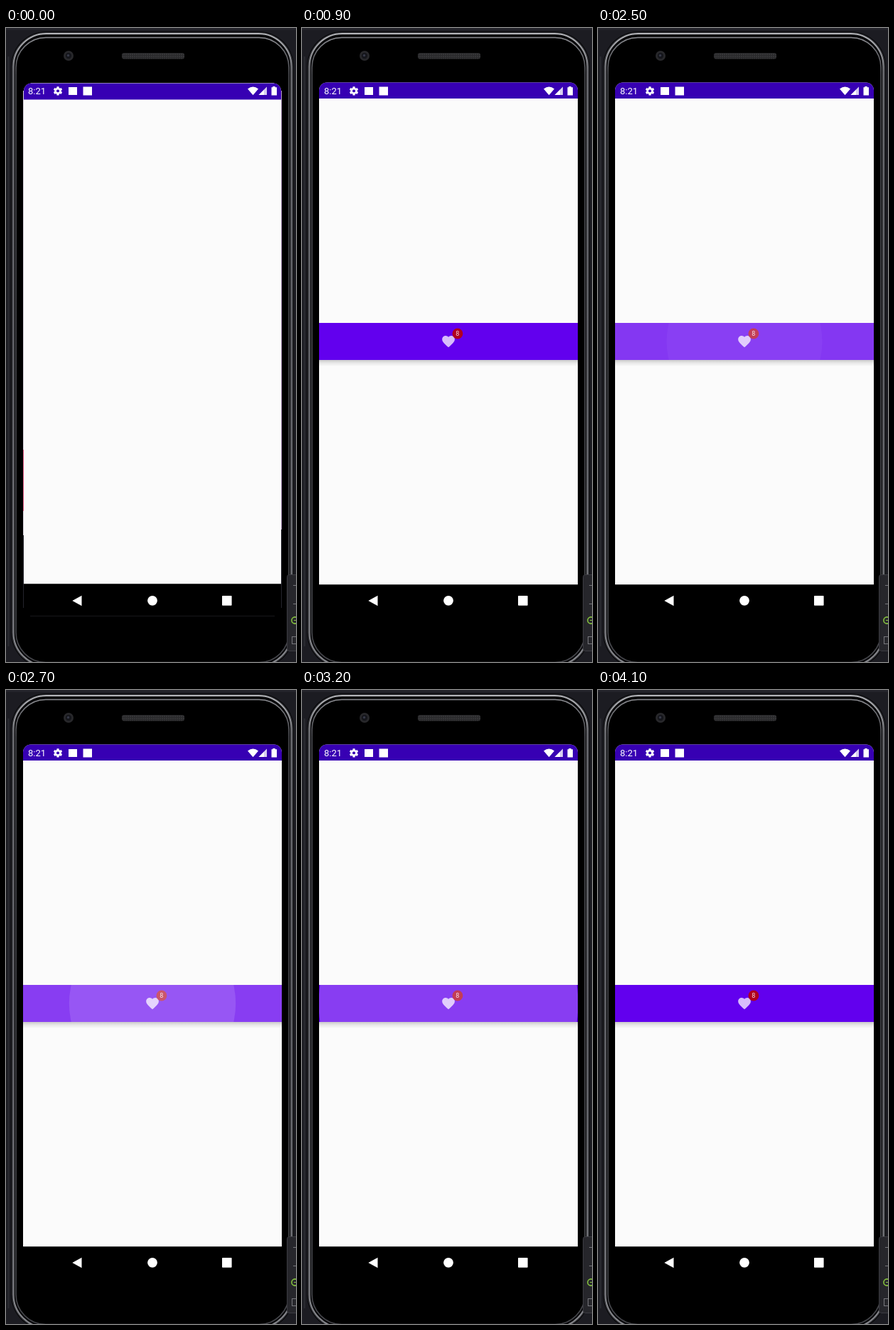
Recreate the animation shown at these times as an HTML page. Size 408 by 890 pixels, loop 4600 ms.

```html
<!DOCTYPE html>
<html lang="en">
<head>
<meta charset="utf-8">
<title>Badge ripple</title>
<style>
  html, body { margin: 0; width: 100%; height: 100%; overflow: hidden; background: #1c1c22; }
  svg { display: block; width: 100vw; height: 100vh; }
  text { font-family: Roboto, sans-serif; fill: #fff; }
</style>
</head>
<body>
<svg viewBox="0 0 408 890">
  <defs>
    <linearGradient id="metal" x1="0" y1="0" x2="0" y2="1">
      <stop offset="0" stop-color="#b4b5b9"/>
      <stop offset=".06" stop-color="#77787d"/>
      <stop offset=".5" stop-color="#6c6d73"/>
      <stop offset="1" stop-color="#85868b"/>
    </linearGradient>
    <linearGradient id="lip" x1="0" y1="0" x2="0" y2="1">
      <stop offset="0" stop-color="#8b8c91"/>
      <stop offset=".06" stop-color="#4a4b50"/>
      <stop offset="1" stop-color="#46474c"/>
    </linearGradient>
    <linearGradient id="shade" x1="0" y1="0" x2="0" y2="1">
      <stop offset="0" stop-color="#000" stop-opacity=".2"/>
      <stop offset=".45" stop-color="#000" stop-opacity=".08"/>
      <stop offset="1" stop-color="#000" stop-opacity="0"/>
    </linearGradient>
    <pattern id="mesh" width="3" height="3" patternUnits="userSpaceOnUse">
      <rect width="3" height="3" fill="#29292b"/>
      <circle cx="1" cy="1" r=".8" fill="#454548"/>
    </pattern>
    <clipPath id="screenClip"><path id="screenShape"/></clipPath>
    <clipPath id="barClip"><rect x="24" y="414" width="364" height="52"/></clipPath>
  </defs>

  <!-- phone body -->
  <rect width="408" height="890" fill="#1c1c22"/>
  <rect width="408" height="3" fill="#24242b"/>
  <path d="M3.5 40V868" stroke="#2b2c32" stroke-width="2"/>
  <rect x="7" y="5" width="398" height="893" rx="49" fill="#08080a"/>
  <g fill="none">
    <rect x="8.5" y="6.5" width="395" height="890" rx="47.5" stroke="#3b3c41"/>
    <rect x="10.5" y="8" width="391" height="887" rx="46" stroke="url(#metal)" stroke-width="2.2"/>
  </g>
  <rect x="14" y="13.5" width="384" height="877" rx="42" fill="#000" stroke="url(#lip)" stroke-width="1.6"/>
  <circle cx="88" cy="39" r="7" fill="#28282b"/>
  <circle cx="88" cy="39" r="4.2" fill="#15161b"/>
  <circle cx="87.5" cy="38.5" r="1.7" fill="#353846"/>
  <rect x="163" y="35" width="88" height="8.5" rx="3" fill="url(#mesh)"/>

  <!-- screen -->
  <g clip-path="url(#screenClip)">
    <rect x="24" y="76" width="364" height="706" fill="#fbfbfb"/>
    <rect id="status" x="24" y="76" width="364" fill="#3700b3"/>
  </g>
  <g id="edges" fill="none">
    <path d="M24.5 88V712" stroke="#d9d3de"/>
    <path d="M24.5 592V678" stroke="#e0577f"/>
    <path d="M387.5 88V704" stroke="#b99fc6"/>
    <path d="M35 77.5H377" stroke="#8f80bd"/>
    <path d="M24.5 712V814M387.5 704V814" stroke="#24242c"/>
    <path d="M34 825.5H378" stroke="#17171b"/>
  </g>
  <g fill="#fff">
    <text x="31" y="93" font-size="13">8:21</text>
    <g id="gear"></g>
    <rect x="88" y="83" width="12" height="11"/>
    <rect x="108.5" y="82.5" width="12.5" height="12"/>
    <path d="M340 85.6Q347.5 79.3 355 85.6L347.5 94.3Z"/>
    <path d="M367 82.5V94H355.5Z" opacity=".45"/>
    <path d="M363 86.5V94H355.5Z"/>
    <path d="M367 82.5V94H363V86.5Z" opacity=".65"/>
    <path d="M375.3 82H378.7V83.2H381V94.5H373.5V83.2H375.3Z"/>
    <path d="M93.3 804L106.5 796.8V811.2Z"/>
    <circle cx="206" cy="803.8" r="6.9"/>
    <rect x="304" y="797" width="13.6" height="13.8" rx=".8"/>
  </g>

  <!-- bar with badge -->
  <g id="bar">
    <rect x="24" y="466" width="364" height="9" fill="url(#shade)"/>
    <rect x="24" y="414" width="364" height="52" fill="#6200ee"/>
    <path transform="translate(195.4 429.4) scale(.886)" fill="#d7bdfb" d="M12 21.35L10.55 20.03C5.4 15.36 2 12.28 2 8.5 2 5.42 4.42 3 7.5 3c1.74 0 3.41.81 4.5 2.09C13.09 3.81 14.76 3 16.5 3 19.58 3 22 5.42 22 8.5c0 3.78-3.4 6.86-8.55 11.54Z"/>
    <circle cx="218.9" cy="429" r="7.4" fill="#b00020"/>
    <text x="218.9" y="432.4" font-size="9" text-anchor="middle" fill-opacity=".87">8</text>
    <g id="ripples" clip-path="url(#barClip)" fill="#fff"></g>
  </g>

  <!-- side toolbar -->
  <rect x="395.5" y="767.5" width="30" height="107" rx="3" fill="#26262b" stroke="#3c3c42"/>
  <g fill="none" stroke="#77777d">
    <path d="M404 782.5H408M404 808.5H408"/>
    <rect x="402.5" y="854.5" width="12" height="10"/>
    <circle cx="406.5" cy="831.5" r="4.6" stroke="#85c13e" stroke-width="1.6"/>
    <path d="M405 831.5H408" stroke="#85c13e"/>
  </g>
</svg>
<script>
  const LOOP = 4600, STEP = 100;
  const TAPS = [2036, 2262, 2488, 2660, 2821, 3059];
  const GROW = 225, FADE_IN = 75, FADE_OUT = 120;
  const R0 = 109, R1 = 191, PRESSED = 0.24;

  const $ = id => document.getElementById(id);
  const clamp = v => Math.max(0, Math.min(1, v));
  const show = (id, on) => $(id).setAttribute("visibility", on ? "visible" : "hidden");

  function add(parent, tag, attrs) {
    const el = document.createElementNS("http://www.w3.org/2000/svg", tag);
    for (const k in attrs) el.setAttribute(k, attrs[k]);
    return parent.appendChild(el);
  }

  // cubic-bezier(.4, 0, .2, 1)
  function ease(x) {
    let lo = 0, hi = 1;
    for (let i = 0; i < 20; i++) {
      const u = (lo + hi) / 2, v = 1 - u;
      if (1.2 * u * v * v + 0.6 * u * u * v + u * u * u < x) lo = u;
      else hi = u;
    }
    return lo * lo * (3 - 2 * lo);
  }

  for (let i = 0; i < 6; i++) {
    add($("gear"), "rect", { x: 71.4, y: 82.2, width: 3.2, height: 4, rx: 0.5, transform: `rotate(${i * 60} 73 88.4)` });
  }
  add($("gear"), "circle", { cx: 73, cy: 88.4, r: 3.4, fill: "none", stroke: "#fff", "stroke-width": 2.6 });

  const ripples = TAPS.map(() => add($("ripples"), "circle", { cx: 206, cy: 440 }));

  function screenPath(inset) {
    const l = 24 + inset, r = 388 - inset, t = 76.6 + inset, b = 781.3 - inset, c = 11;
    return `M${l} ${b}V${t + c}a${c} ${c} 0 0 1 ${c} ${-c}H${r - c}a${c} ${c} 0 0 1 ${c} ${c}V${b}Z`;
  }

  function draw(ms) {
    const t = Math.floor(ms / STEP) * STEP;
    const opening = t < 100;
    $("screenShape").setAttribute("d", screenPath(opening ? 1 : 0));
    $("status").setAttribute("height", opening ? 24.5 : 23);
    show("edges", opening);
    show("bar", t >= 800);

    ripples.forEach((el, i) => {
      const age = t - TAPS[i];
      const alpha = clamp(age / FADE_IN) * (1 - clamp((age - GROW) / FADE_OUT));
      el.setAttribute("r", R0 + (R1 - R0) * ease(clamp(age / GROW)));
      el.setAttribute("opacity", PRESSED * alpha);
    });
  }

  const start = performance.now();
  function tick() {
    draw((performance.now() - start) % LOOP);
    requestAnimationFrame(tick);
  }
  draw(0);
  requestAnimationFrame(tick);
</script>
</body>
</html>
```
